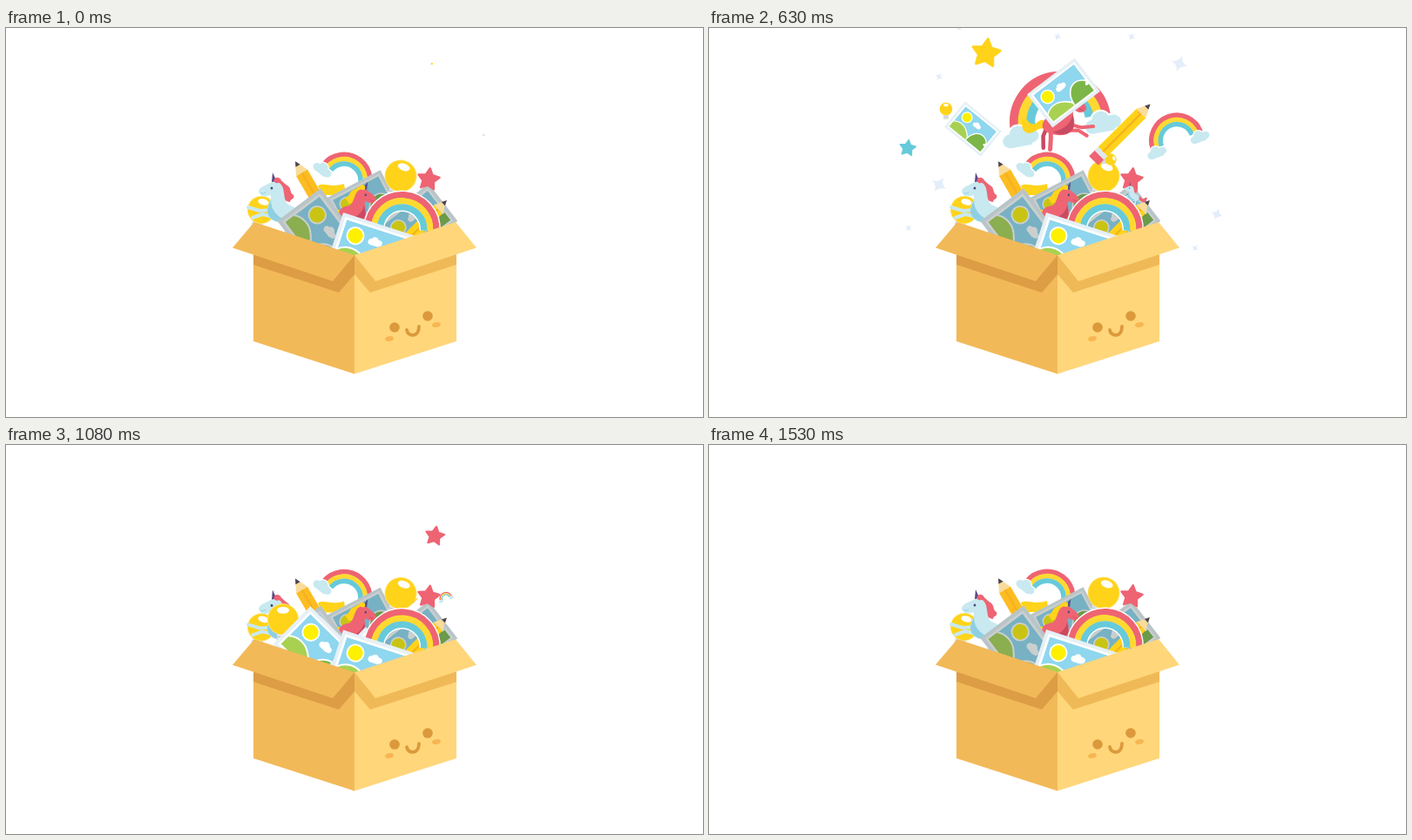
Animation of 800x447 px, one loop 1560 ms. Source, as an HTML page with a canvas:

```html
<!DOCTYPE html>
<html lang="en">
<head>
<meta charset="utf-8">
<title>Toy box</title>
<style>
  html, body { margin: 0; width: 100%; height: 100%; overflow: hidden; background: #fff; }
  canvas { display: block; width: 100vw; height: 100vh; }
</style>
</head>
<body>
<canvas id="stage" width="800" height="447"></canvas>
<script>
const ctx = document.getElementById('stage').getContext('2d');
const LOOP = 1560, STEP = 30, GROW = 300, SHRINK = 190;
const RED = '#ee6473', YELLOW = '#ffd31a', TEAL = '#66cadb', ICE = '#c8e9f0', PALE = '#e3eefa';

const clamp = v => Math.max(0, Math.min(1, v));
const smooth = p => p * p * (3 - 2 * p);

function put(x, y, deg, sx, draw, sy = sx) {
  ctx.save();
  ctx.translate(x, y);
  ctx.rotate(deg * Math.PI / 180);
  ctx.scale(sx, sy);
  draw();
  ctx.restore();
}

function fill(d, color) {
  ctx.fillStyle = color;
  ctx.fill(new Path2D(d));
}

function line(d, color, width) {
  ctx.strokeStyle = color;
  ctx.lineWidth = width;
  ctx.lineCap = ctx.lineJoin = 'round';
  ctx.stroke(new Path2D(d));
}

function oval(x, y, rx, ry, color, turn = 0) {
  ctx.beginPath();
  ctx.ellipse(x, y, rx, ry, turn, 0, 7);
  ctx.fillStyle = color;
  ctx.fill();
}

function rect(x, y, w, h, color) {
  ctx.fillStyle = color;
  ctx.fillRect(x, y, w, h);
}

// Toys, each drawn around its own origin

function cloud(color = ICE) {
  const puffs = (grow, c) => {
    oval(-12, 4, 9 + grow, 8 + grow, c);
    oval(-2, -3, 10 + grow, 9 + grow, c);
    oval(11, 2, 10 + grow, 8 + grow, c);
    rect(-13, 2 - grow, 25, 10 + 2 * grow, c);
  };
  puffs(2, '#fff');
  puffs(0, color);
}

function rainbow(left = true, right = true) {
  const band = (r, w, c) => {
    ctx.beginPath();
    ctx.arc(0, 0, r, Math.PI, 2 * Math.PI);
    ctx.strokeStyle = c;
    ctx.lineWidth = w;
    ctx.lineCap = 'butt';
    ctx.stroke();
  };
  band(43.5, 33, '#fff');
  band(53, 10.4, RED);
  band(43.5, 10, '#ffd932');
  band(34, 10, TEAL);
  if (left) put(-48, 8, 0, 1, cloud);
  if (right) put(48, 8, 0, 1, cloud);
}

function bulb() {
  rect(-8, 15, 16, 17, '#c9cfd8');
  for (let y = 20; y < 32; y += 4) rect(-8, y, 16, 1.2, '#eef1f5');
  oval(0, 0, 20.5, 20.5, '#ffe36a');
  oval(0, 0, 19.5, 19.5, YELLOW);
  oval(0, -12, 8, 4.5, '#fff');
}

function pencil(body = YELLOW) {
  rect(-46, -7.5, 11, 15, RED);
  rect(-37, -7.5, 6, 15, '#dfe7ef');
  rect(-31, -7.5, 62, 15, body);
  rect(-31, -1, 62, 2.4, '#f6b21d');
  fill('M31-7.5 46 0 31 7.5Z', '#f9dc9a');
  fill('M40-3 46 0 40 3Z', '#4a4555');
}

function photo(dark = false) {
  rect(-43.5, -30.5, 87, 61, '#e6f0f6');
  rect(-39.5, -26.5, 79, 53, '#fff');
  ctx.save();
  ctx.beginPath();
  ctx.rect(-37, -24, 74, 48);
  ctx.clip();
  rect(-37, -24, 74, 48, '#8fd6ef');
  put(2, -10, 0, .36, () => cloud('#fff'));
  put(35, 7, 0, .3, () => cloud('#fff'));
  const near = 'M-38 12C-30 4-18 4-10 9-3 13 2 18 5 25', far = 'M2 25C2 8 12-2 22-2 30-2 34 2 38 8';
  fill(near + 'H-38Z', '#a8d152');
  line(near, '#fff', 2);
  fill(far + 'V25Z', '#7cb648');
  line(far, '#fff', 2);
  put(37, 9, 0, .2, () => cloud('#fff'));
  oval(-22, -9.5, 10.5, 10.5, '#fff');
  oval(-22, -9.5, 8.7, 8.7, '#fdf000');
  ctx.restore();
  if (dark) rect(-43.5, -30.5, 87, 61, 'rgba(60,80,75,.27)');
}

function unicorn(coat, shade, mane) {
  fill('M16 6C24 2 24 12 31 12 36 11 37 5 43 9 42 14 41 22 34 23 27 24 24 15 16 14Z', mane);
  fill('M-8-31C-2-35 2-27 6-25 11-22 8-17 13-14 15-9 9-10 9-6 3-6-4-14-8-31Z', mane);
  line('M13 12 15 23 12 36', shade, 4.5);
  line('M8 14 6 23 4 36', coat, 5);
  line('M-10 11-23 8-34 12', coat, 4);
  line('M-9 3-26 4-39 0', coat, 4);
  fill('M-27-18C-26-24-19-25-14-28-8-31-1-29 1-22 3-14 2-7 7-3 15-1 20 5 18 13 14 20-3 20-11 15-19 10-18 2-15-5-13-9-12-12-14-14-18-12-25-11-27-18Z', coat);
  fill('M-13-9C-13 2-8 9 5 16-5 19-16 14-17 5-17 0-14-4-13-9Z', shade);
  fill('M-12-29-11-40-6.5-30Z', '#5b4a86');
  fill('M-9-29C-11-34-4-37-1-31-3-29-5-26-9-29Z', mane);
  oval(-12, -22, 1.4, 1.6, '#4a4a78');
  line('M-24-16Q-21-15-19-17', shade, 1);
}
const iceUnicorn = () => unicorn(ICE, '#8fcfe2', RED);
const redUnicorn = () => put(0, 0, 0, -1, () => unicorn(RED, '#c94a63', YELLOW), 1);

function star(color) {
  ctx.beginPath();
  for (let i = 0; i < 10; i++) {
    const a = i * Math.PI / 5 - Math.PI / 2, r = i % 2 ? .48 : .92;
    ctx.lineTo(r * Math.cos(a), r * Math.sin(a));
  }
  ctx.closePath();
  ctx.fillStyle = ctx.strokeStyle = color;
  ctx.lineWidth = .16;
  ctx.lineJoin = 'round';
  ctx.fill();
  ctx.stroke();
}
const redStar = () => put(0, 0, 0, 14, () => star(RED));
const sparkle = () => fill('M0-1Q.15-.15 1 0 .15.15 0 1-.15.15-1 0-.15-.15 0-1Z', PALE);

// Twinkles swell and vanish in place: x, y, radius, start, end, colour
const twinkles = [
  [318, 29, 18, 360, 900, YELLOW], [228, 138, 12, 480, 940, TEAL],
  [540, 41, 14, 270, 750], [479, 136, 6, 210, 480], [583, 214, 10, 375, 720],
  [264, 180, 10, 450, 840], [229, 230, 5, 480, 900], [558, 253, 5, 480, 900],
  [264, 56, 5, 420, 800], [400, 10, 5, 480, 730], [485, 10, 5, 480, 840],
  [287, 0, 5, 540, 870], [384, 132, 4, 880, 1020]
];

// Toys pop up at from, then drop to land; stay delays the shrinking
const toys = [
  { draw: rainbow, from: [403, 92], land: [405, 221], deg: -10, born: 90, drop: 565 },
  { draw: redUnicorn, from: [403, 105], land: [408, 214], deg: 12, born: 60, drop: 681 },
  { draw: bulb, from: [489, 41], land: [461, 151], deg: 73, born: -8, drop: 310, fall: 172 },
  { draw: iceUnicorn, from: [548, 123], land: [487, 192], born: -6, drop: 310, fall: 180 },
  { draw: pencil, from: [474, 120], land: [470, 178], deg: -45, spin: 45, born: 252, drop: 700 },
  { draw: rainbow, from: [537, 129], land: [505, 176], deg: -20, size: .55, born: 350, drop: 609, fall: 306 },
  { draw: bulb, from: [272, 93], land: [318, 200], size: .88, born: 560, drop: 872, stay: 150 },
  { draw: photo, from: [303, 116], land: [359, 237], deg: 44.5, spin: -14, born: 515, drop: 887, stay: 150 },
  { draw: photo, from: [407, 74.5], land: [405, 258], deg: -46, spin: 54, size: .94, born: 450, drop: 882, stay: 140 },
  { draw: redStar, from: [493, 97], land: [485, 174], deg: 10, size: .86, born: 620, drop: 1030, fall: 160 }
];

// Vertical bounce of the pile: time, offset
const bounce = [[0, 0], [90, 4], [210, -2], [330, 0], [780, 0], [960, 9.5], [1170, -5.5], [1350, 2], [1530, 0], [LOOP, 0]];

function dip(t) {
  const i = bounce.findIndex(k => k[0] > t);
  const [t0, a] = bounce[i - 1], [t1, b] = bounce[i];
  return a + (b - a) * smooth((t - t0) / (t1 - t0));
}

function drawToy(toy, t, shift) {
  const { draw, from, land, deg = 0, spin = 0, size = 1, born, drop, fall = 185, stay = 20 } = toy;
  if (t < born) return;
  const grown = 1 - (1 - clamp((t - born) / GROW)) ** 2;
  const fell = clamp((t - drop) / fall) ** 2;
  const left = 1 - clamp((t - drop - fall - stay) / SHRINK);
  const s = size * grown * left;
  if (s <= 0) return;
  put(from[0] + (land[0] - from[0]) * fell,
      from[1] + (land[1] - from[1] + shift) * fell,
      deg + spin * (1 - grown), s, () => draw());
}

function backPile() {
  put(388, 175, 38, .56, () => rainbow(true, false));
  put(355, 193, -120, 1, () => pencil('#fcbc22'));
  fill('M358 181C366 177 372 184 388 179L390 192H362Z', YELLOW);
  put(410, 201, -27.5, .8, () => photo(true));
  put(471, 224, -37.7, .89, () => photo(true));
  put(399, 208, 12, .85, redUnicorn);
  put(453, 170, 20, .9, bulb);
  put(485, 174, 8, 1, redStar);
  put(293, 209, 15, .78, bulb);
  put(317, 206, 0, 1, iceUnicorn);
  put(363, 238.5, 53, 1.02, () => photo(true));
}

function frontPile() {
  put(475, 229, -45, .95, pencil);
  put(454.5, 231, 4, .74, () => rainbow(false, false));
  put(419, 254.5, 18, 1, () => photo());
}

function face(shut) {
  const ink = '#dc993c';
  for (const [x, y] of [[446, 344], [484, 331]]) {
    ctx.beginPath();
    if (shut) ctx.arc(x, y - 2, 5.8, -.1, Math.PI - .1);
    else ctx.arc(x, y, 5.8, 0, 7);
    ctx.fillStyle = ink;
    ctx.fill();
  }
  oval(440, 357, 5, 2.8, '#f6b652', -.2);
  oval(494, 341, 5, 2.8, '#f6b652', -.2);
  line('M460 347C461 355 474 356 474 343', ink, 3.8);
}

const SIDE = '#f2b958', LIGHT = '#ffd67a';

function walls() {
  fill('M284 265 400 270V397.5L284 360Z', SIDE);
  fill('M400 270 517 265V360L400 397.5Z', LIGHT);
}

function lid() {
  fill('M284 255V272L382 304 400 283V261Z', '#dc9d45');
  fill('M517 255V272L418 304 400 283V261Z', '#f0b957');
  fill('M285 223 400 261 375 291 260 252.5Z', SIDE);
  fill('M516 223 400 261 424 291 540 252.5Z', LIGHT);
}

function render(t) {
  const shift = dip(t);
  ctx.fillStyle = '#fff';
  ctx.fillRect(0, 0, 800, 447);
  for (const [x, y, r, start, end, color] of twinkles) {
    const p = (t - start) / (end - start);
    if (p > 0 && p < 1) {
      put(x, y, color ? 8 : 57 - 50 * p, r * Math.sin(Math.PI * p), () => color ? star(color) : sparkle());
    }
  }
  put(0, shift, 0, 1, backPile);
  toys.forEach(toy => drawToy(toy, t, shift));
  put(0, shift, 0, 1, frontPile);
  const sy = 1 - shift / 400;
  walls();
  put(0, 397 * (1 - sy), 0, 1, () => {
    lid();
    face(t >= 1110 && t < 1290);
  }, sy);
}

let begin;
function tick(now) {
  begin ??= now;
  render(Math.floor((now - begin) % LOOP / STEP) * STEP);
  requestAnimationFrame(tick);
}
requestAnimationFrame(tick);
</script>
</body>
</html>
```
